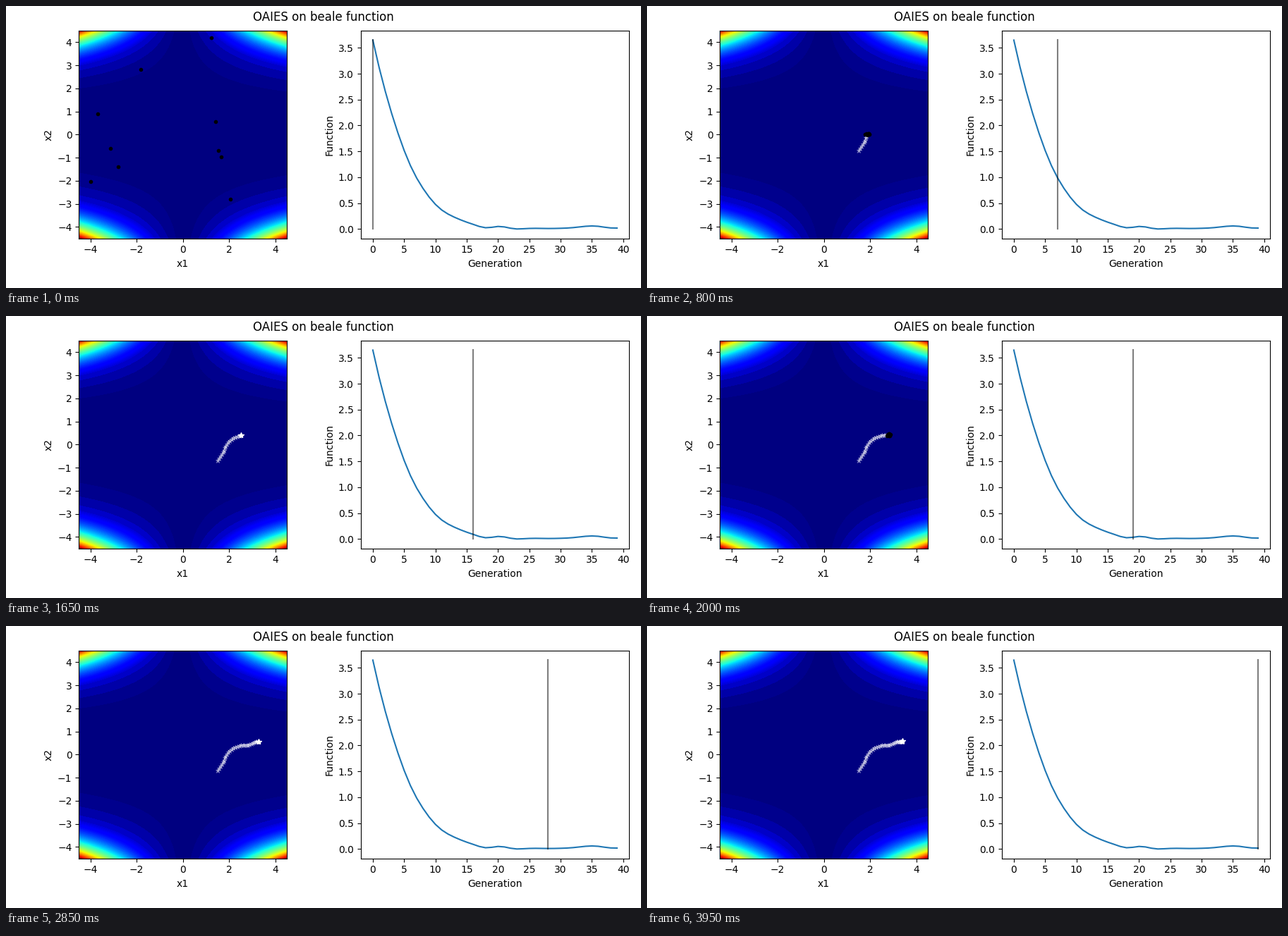
Recreate the animation shown at these times as a matplotlib script. Size 900 by 400 pixels, loop 4000 ms.

```python
import matplotlib.pyplot as plt
import numpy as np
from matplotlib.animation import FuncAnimation

W, H, DPI = 900, 400, 100
GENS, SWARM = 40, 10
LIM = 4.5


def beale(x, y):
    return ((1.5 - x + x * y) ** 2
            + (2.25 - x + x * y ** 2) ** 2
            + (2.625 - x + x * y ** 3) ** 2)


def smooth(t, tk, pk):
    """Cubic Hermite curve through the points pk at times tk."""
    m = np.gradient(pk, tk)
    k = np.clip(np.searchsorted(tk, t, "right") - 1, 0, len(tk) - 2)
    h = tk[k + 1] - tk[k]
    u = (t - tk[k]) / h
    ease = u * u * (3 - 2 * u)
    return (pk[k] + (pk[k + 1] - pk[k]) * ease
            + h * u * (1 - u) * (m[k] * (1 - u) - m[k + 1] * u))


# the search path bends through a few (generation, x1, x2) points
tk, xk, yk = np.array([
    (0, 1.505, -0.695), (4, 1.75, -0.34), (8, 1.90, 0.015),
    (12, 2.19, 0.275), (16, 2.525, 0.405), (20, 2.824, 0.402),
    (24, 3.10, 0.535), (30, 3.33, 0.565), (36, 3.40, 0.553),
    (39, 3.41, 0.59)]).T
gens = np.arange(GENS)
path = np.column_stack([smooth(gens, tk, xk), smooth(gens, tk, yk)])
history = beale(*path.T)

# the first population is spread wide, later ones cluster around the path
rng = np.random.default_rng(4)
swarms = path[:, None] + rng.normal(0, 0.035, (GENS, SWARM, 2))
swarms[0] = [(1.22, 4.2), (-1.81, 2.82), (-3.68, 0.9), (1.42, 0.56),
             (-3.13, -0.6), (1.53, -0.7), (1.65, -0.96), (-2.81, -1.4),
             (-4, -2.03), (2.07, -2.79)]

fig, (land, curve) = plt.subplots(1, 2, figsize=(W / DPI, H / DPI), dpi=DPI)
title = fig.suptitle("OAIES on beale function", y=0.9825)
title.set_in_layout(False)

gx, gy = np.meshgrid(*[np.linspace(-LIM, LIM, 150)] * 2)
# wide bands on the flat floor, fine ones towards the corners
levels = np.r_[0, 1000, 4000, 9000, 14000:183000:1000]
land.contourf(gx, gy, beale(gx, gy), levels=levels, cmap="jet")
land.set(xlim=(-LIM, LIM), ylim=(-LIM, LIM), xlabel="x1", ylabel="x2",
         xticks=range(-4, 5, 2), yticks=range(-4, 5), aspect="equal")
trail, = land.plot([], [], "w*", ms=5, mew=0.5, alpha=0.5)
star, = land.plot([], [], "w*")
dots, = land.plot([], [], "k.")

curve.plot(gens, history)
cursor, = curve.plot([0, 0], [history.min(), history.max()], "k", alpha=0.5)
curve.set(xlabel="Generation", ylabel="Function",
          xticks=range(0, 41, 5), yticks=np.arange(0, 3.6, 0.5))
curve.set_xlim(-1.95, 40.95)
curve.set_ylim(-0.05 * history.max(), 1.05 * history.max())
fig.tight_layout(rect=[0, 0.03, 1, 0.95])


def update(i):
    # even steps show the sampled population, odd steps the new best point
    gen, show_best = divmod(i, 2)
    done = gen + show_best
    trail.set_data(*path[:done].T)
    star.set_data(*path[gen:done].T)
    dots.set_data(*swarms[gen, :0 if show_best else SWARM].T)
    cursor.set_xdata([max(done - 1, 0)] * 2)
    return trail, star, dots, cursor


anim = FuncAnimation(fig, update, frames=2 * GENS, interval=50,
                     repeat=True, repeat_delay=0)
plt.show()
```
